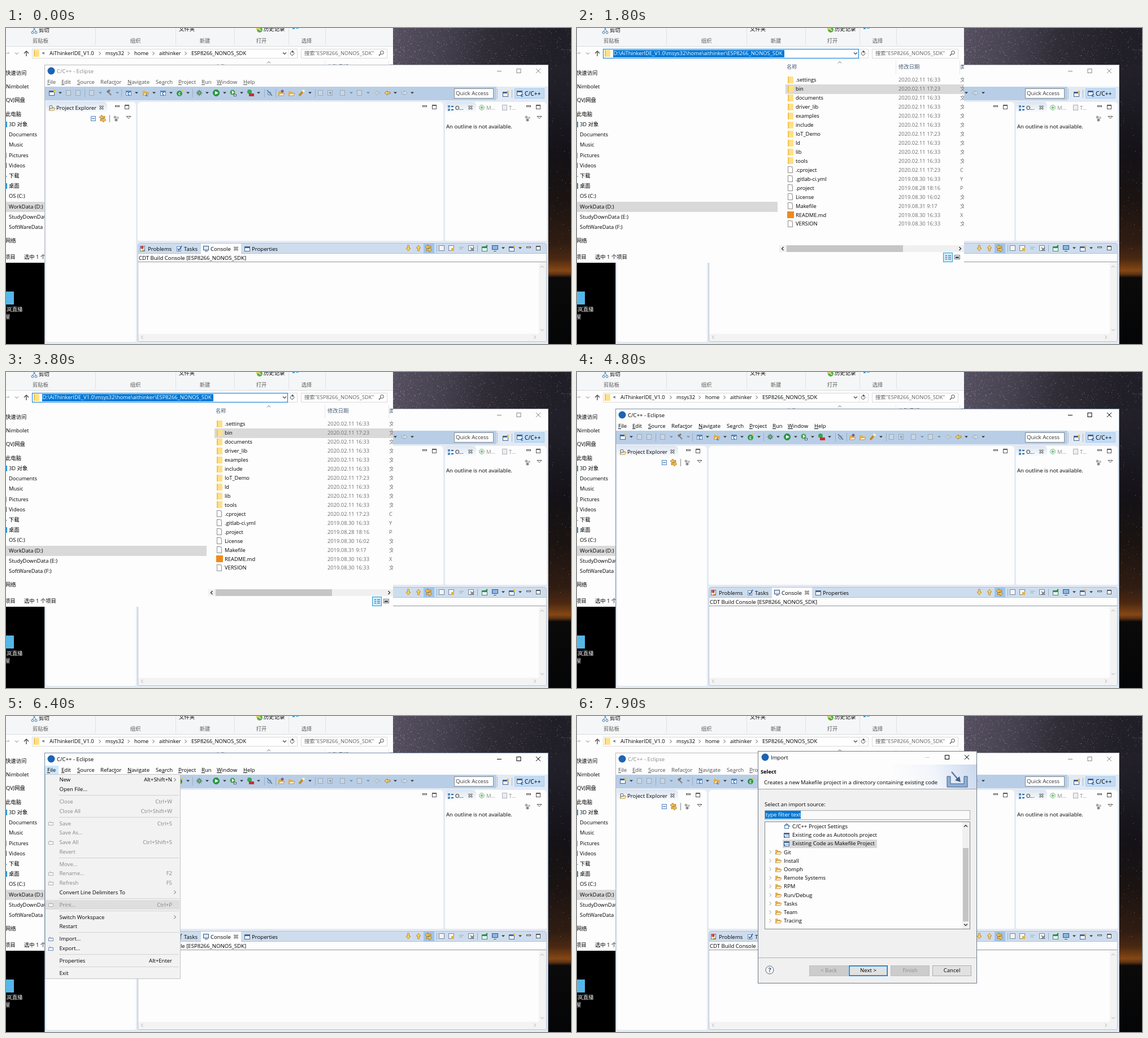
An HTML page with a canvas for the animation above (8 s loop, 1000 px wide and 560 px high).

```html
<!DOCTYPE html>
<html lang="zh">
<head>
<meta charset="utf-8">
<title>Import a Makefile project</title>
<style>
html, body { margin: 0; width: 100%; height: 100%; overflow: hidden; background: #000; }
canvas { display: block; width: 1000px; height: 560px; }
</style>
</head>
<body>
<canvas id="stage" width="1000" height="560"></canvas>
<script>
const LOOP = 8000;
const FONT = '"Open Sans","Noto Sans CJK SC","Noto Sans CJK",sans-serif';
const BLUE = '#0078d7', HOVER = '#91c9f7', GREY = '#d9d9d9', DIM = '#8c8c8c';
const SYSTEM_SIZE = 9.35, APP_SIZE = 9.58;
let c = document.getElementById('stage').getContext('2d');
let fontSize = SYSTEM_SIZE;

function box(x, y, w, h, fill, edge) {
  if (fill) { c.fillStyle = fill; c.fillRect(x, y, w, h); }
  if (edge) { c.strokeStyle = edge; c.lineWidth = 1; c.strokeRect(x + .5, y + .5, w - 1, h - 1); }
}
function text(s, x, y, color = '#000', align = 'left', size = fontSize, weight = '') {
  c.font = `${weight} ${size}px ${FONT}`;
  c.textAlign = align;
  c.textBaseline = 'alphabetic';
  c.fillStyle = color;
  c.fillText(s, x, Math.round(y + 3.4));
}
function path(points, color, width = 1) {
  c.strokeStyle = color;
  c.lineWidth = width;
  c.beginPath();
  for (let i = 0; i < points.length; i += 2) c.lineTo(points[i], points[i + 1]);
  c.stroke();
}
function poly(points, color) {
  c.fillStyle = color;
  c.beginPath();
  for (let i = 0; i < points.length; i += 2) c.lineTo(points[i], points[i + 1]);
  c.fill();
}
function disc(x, y, r, fill, edge) {
  c.beginPath();
  c.arc(x, y, r, 0, 7);
  if (fill) { c.fillStyle = fill; c.fill(); }
  if (edge) { c.strokeStyle = edge; c.lineWidth = 1; c.stroke(); }
}
function panel(x, y, w, h, fill = '#fdfdfd', edge) {
  c.beginPath();
  c.roundRect(x + .5, y + .5, w - 1, h - 1, [5, 5, 2, 2]);
  c.fillStyle = fill;
  c.fill();
  c.strokeStyle = edge || fill;
  c.lineWidth = 1;
  c.stroke();
}
function fade(alpha, draw) {
  if (alpha <= 0) return;
  c.save();
  c.globalAlpha = alpha;
  draw();
  c.restore();
}
const gradient = (x0, y0, x1, y1, stops) => {
  const g = c.createLinearGradient(x0, y0, x1, y1);
  stops.forEach(([p, color]) => g.addColorStop(p, color));
  return g;
};

// Small glyphs, all placed by their centre
const chevrons = { right: [-1.5, -3, 1.5, 0, -1.5, 3], left: [1.5, -3, -1.5, 0, 1.5, 3], up: [-3, 1.5, 0, -1.5, 3, 1.5], down: [-3, -1.5, 0, 1.5, 3, -1.5] };
const chevron = (x, y, dir, color = '#555', w = 1) => path(chevrons[dir].map((v, i) => v + (i % 2 ? y : x)), color, w);
const drop = (x, y, color = '#333') => poly([x - 3, y - 1.5, x + 3, y - 1.5, x, y + 1.5], color);
function cross(x, y, r, color, w = 1) {
  path([x - r, y - r, x + r, y + r], color, w);
  path([x + r, y - r, x - r, y + r], color, w);
}
function tabClose(x, y) {
  cross(x, y, 3.2, '#555', 2.6);
  cross(x, y, 3.2, '#fdfdfd', 1);
}
function arrow(x, y, dx, dy, color, edge) {
  const at = (a, b) => [x + a * dx - b * dy, y + a * dy + b * dx];
  const p = [...at(5, 0), ...at(0, -4), ...at(0, -1.5), ...at(-5, -1.5), ...at(-5, 1.5), ...at(0, 1.5), ...at(0, 4)];
  poly(p, color);
  path([...p, p[0], p[1]], edge, .8);
}
function folder(x, y) {
  box(x - 5, y - 6, 10, 12, '#ffe08a');
  box(x - 5, y - 6, 2, 12, '#f2c34e');
}
function openFolder(x, y) {
  poly([x - 5, y + 4, x - 5, y - 4, x - 1, y - 4, x, y - 2, x + 4, y - 2, x + 4, y + 4], '#e9b14c');
  poly([x - 5, y + 4, x - 2, y, x + 6, y, x + 4, y + 4], '#fff0c4');
  path([x - 5, y + 4, x - 2, y, x + 6, y, x + 4, y + 4, x - 5, y + 4], '#b67b22', .8);
}
function sheet(x, y) {
  box(x - 4, y - 6, 9, 12, '#fff', '#8d8d8d');
  box(x + 2, y - 6, 3, 3, '#c8c8c8');
}
function win(x, y, color = '#47658f') {
  box(x - 5, y - 4, 10, 9, '#f4f8fd', color);
  box(x - 5, y - 4, 10, 3, color);
}
function cfile(x, y, mark = '#2f67b2') {
  win(x, y, '#5c86b8');
  text('c', x, y + .5, mark, 'center', 8, 'bold');
}
function swap(x, y) {
  arrow(x - 1, y - 2, -1, 0, '#f3c35b', '#a06d14');
  arrow(x + 1, y + 3, 1, 0, '#f3c35b', '#a06d14');
}
function minMax(x, y) {
  box(x - 4, y - 3, 8, 3, '#fff', '#555');
  box(x + 13, y - 4, 8, 8, '#fff', '#555');
  box(x + 13, y - 4, 8, 2, '#555');
}
function titleButtons(x, y, gap, color) {
  path([x - 4, y + .5, x + 4, y + .5], color);
  box(x + gap - 4, y - 4, 8, 8, null, color);
  cross(x + gap * 2, y, 4, color);
}
function dots(x, y) {
  disc(x - 2, y - 2, 2.5, '#aaa');
  disc(x + 3, y - 1, 2, '#bbb');
  disc(x, y + 3, 2.5, '#888');
}

function makeDesktop() {
  const layer = document.createElement('canvas');
  layer.width = 1000;
  layer.height = 560;
  const main = c;
  c = layer.getContext('2d');
  let seed = 11;
  const rnd = () => (seed = seed * 16807 % 2147483647) / 2147483647;
  box(0, 0, 1000, 560, '#000');
  box(684, 0, 316, 560, gradient(0, 0, 0, 560, [[0, '#28252f'], [.2, '#1f1d26'], [.4, '#141217'], [.54, '#1a1311'],
    [.68, '#2f1c12'], [.73, '#4a2812'], [.768, '#854816'], [.78, '#5a3012'], [.79, '#0b0a0b'], [1, '#040506']]));
  box(684, 0, 316, 66, gradient(684, 10, 960, 66, [[0, '#544e5e'], [.3, '#474250'], [.6, '#2f2c36'], [1, '#201e26']]));
  // Dense star haze on the left of the band, sparse elsewhere
  for (let i = 0; i < 3000; i++) {
    const band = i < 2800, x = band ? 684 + 316 * rnd() ** 1.8 : 960 + 40 * rnd(), y = band ? 66 * rnd() : 66 + 330 * rnd();
    c.fillStyle = `rgba(205,198,215,${.04 + .5 * rnd() ** 5})`;
    c.fillRect(x | 0, y | 0, 1, 1);
  }
  box(0, 467, 14, 23, '#55b7e8');
  text('浮岚直播', -8, 499, '#fff');
  text('屋', -2, 512, '#fff');
  c = main;
  return layer;
}
const desktop = makeDesktop();

const places = [['快速访问', -1, 80], ['Nimbolet', 0, 104], ['QVJ网盘', 0, 128], ['此电脑', -1, 153], ['3D 对象', 5, 171],
  ['Documents', 5, 189], ['Music', 5, 207], ['Pictures', 5, 226], ['Videos', 5, 244], ['下载', 5, 262], ['桌面', 5, 280],
  ['OS (C:)', 5, 298], ['WorkData (D:)', 5, 317], ['StudyDownData (E:)', 5, 335], ['SoftWareData (F:)', 5, 353],
  ['网络', -1, 377], ['项目', -2, 406], ['选中 1 个项目', 32, 406]];
const files = ['.settings', 'bin', 'documents', 'driver_lib', 'examples', 'include', 'IoT_Demo', 'ld', 'lib', 'tools',
  '.cproject', '.gitlab-ci.yml', '.project', 'License', 'Makefile', 'README.md', 'VERSION'];
const dates = { 10: '2020.02.11 17:23', 12: '2019.08.28 18:16', 13: '2019.08.30 16:02', 14: '2019.08.31 9:17' };
const kinds = { 10: 'C', 11: 'Y', 12: 'P', 15: 'X' };

function drawAddress(t) {
  const editing = t >= 1300 && t < 3900;
  path([0, 45, 6, 45, 3, 42], '#aaa');
  chevron(19, 45, 'down', '#777');
  path([36, 50, 36, 41], '#444', 1.3);
  path([32, 45, 36, 41, 40, 45], '#444', 1.3);
  box(46, 37, 470, 17, '#fff', GREY);
  folder(54, 45);
  if (editing) {
    box(46, 37, 453, 17, null, BLUE);
    box(64, 39, 303, 13, BLUE);
    text('D:\\AiThinkerIDE_V1.0\\msys32\\home\\aithinker\\ESP8266_NONOS_SDK', 64.5, 45, '#fff');
    if (t < 1800 || (t >= 2300 && t < 2800)) box(366, 39, 1, 13, '#ff8728');
  } else {
    text('«', 64, 44);
    [['AiThinkerIDE_V1.0', 77], ['msys32', 176], ['home', 227], ['aithinker', 271], ['ESP8266_NONOS_SDK', 328]]
      .forEach(([s, x], i) => { if (i) chevron(x - 10, 45, 'right'); text(s, x, 45); });
    box(499, 38, 1, 15, '#e5e5e5');
    if (t >= 900 && t < 1200) box(487, 37, 13, 17, '#e5f3ff', '#99d1ff');
  }
  chevron(493, 45, 'down', '#444', 1.2);
  c.beginPath();
  c.arc(506.5, 45, 3.3, -.6, 4.8);
  c.strokeStyle = '#555'; c.lineWidth = 1; c.stroke();
  poly([506, 39.5, 510, 42, 506, 44], '#555');
  box(522, 37, 153, 17, '#fff', GREY);
  text('搜索"ESP8266_NONOS_SDK"', 528, 45, '#606060');
  disc(665.5, 43.5, 3, null, '#444');
  path([663, 46, 660, 49], '#444', 1.3);
}

function drawExplorer(t) {
  fontSize = SYSTEM_SIZE;
  c.save();
  c.beginPath();
  c.rect(0, 0, 685, 416);
  c.clip();
  box(0, 0, 685, 416, '#fdfdfd');
  box(0, 0, 685, 32, '#f5f6f7');
  box(0, 32, 685, 1, '#dadbdc');
  [158, 300, 404, 500, 565].forEach(x => box(x, 0, 1, 30, '#e0e1e2'));
  [['剪贴板', 61], ['组织', 229], ['新建', 352], ['打开', 452], ['选择', 532]]
    .forEach(([s, x]) => text(s, x, 23, '#5a5a5a', 'center'));
  path([48, -1, 53, 6], '#3b78b5'); path([52, -1, 47, 6], '#3b78b5');
  disc(47, 8, 2, null, '#3b78b5'); disc(53, 8, 2, null, '#3b78b5');
  text('剪切', 58, 4); text('文件夹', 306, 2); text('历史记录', 456, 2);
  disc(449, 3, 5, '#58b13e'); box(443, 0, 5, 3, '#f2c34e'); path([449, 0, 449, 4, 452, 4], '#fff');
  box(507, 0, 4, 2, '#4a9ad4'); box(513, 0, 5, 1, '#4a9ad4');
  drawAddress(t);

  box(0, 308, 355, 18, GREY);
  places.forEach(p => text(...p));
  box(0, 166, 2, 10, '#2196d8'); box(0, 275, 2, 10, '#1e90d8'); box(0, 239, 1, 9, '#555');
  box(0, 221, 1, 10, '#999'); path([0, 264, 1.5, 262], '#2f78c4');

  chevron(465, 61, 'up', '#666');
  box(564, 58, 1, 24, '#e5e5e5'); box(677, 58, 1, 24, '#e5e5e5');
  text('名称', 371, 69, '#4c607a'); text('修改日期', 569, 69, '#4c607a'); text('类', 678, 69, '#4c607a');
  box(369, 100, 316, 17, GREY);
  files.forEach((name, i) => {
    const y = 92 + 15.94 * i, px = Math.round(y);
    if (i < 10) folder(378, px);
    else if (i === 15) box(372, px - 6, 12, 12, '#ee8a1d');
    else sheet(377, px);
    text(name, 387, y);
    text(dates[i] || (i < 10 ? `2020.02.11 ${i === 1 || i === 6 ? '17:23' : '16:33'}` : '2019.08.30 16:33'), 569, y, '#6d6d6d');
    text(kinds[i] || '文', 678, y, '#6d6d6d');
  });
  box(358, 385, 327, 12, '#f0f0f0');
  box(371, 385, 206, 12, '#c6c6c6');
  chevron(364, 391, 'left', '#333', 1.4); chevron(678, 391, 'right', '#333', 1.4);
  box(648, 398, 17, 17, '#cce8ff', '#26a0da');
  [403, 406, 409].forEach(y => { box(652, y, 3, 1, '#555'); box(657, y, 5, 1, '#555'); });
  box(668, 402, 10, 8, '#e9eef3', '#777'); box(670, 405, 6, 3, '#456');
  c.restore();
}

const menus = [['File', 73, 0], ['Edit', 98, 0], ['Source', 126, 0], ['Refactor', 167, 5], ['Navigate', 215, 0], ['Search', 265, 2],
  ['Project', 305, 0], ['Run', 346, 0], ['Window', 373, 0], ['Help', 420, 0]];

function drawToolbar(t) {
  box(69, 104, 890, 24, '#b8cee6');
  if (t === 4200) box(514, 107, 31, 18, '#d5e6f7', '#8fb8e0');
  const y = 115;
  [139, 204, 330, 457, 477, 547].forEach(x => box(x, 108, 1, 15, '#98aec8'));
  [96, 167, 197, 231, 262, 292, 322, 356, 387, 417, 447, 538, 611, 641, 689, 719]
    .forEach(x => drop(x, y, x === 167 || x === 197 || x === 611 || x === 641 ? '#7d8b9c' : '#333'));
  win(81, y); box(84, 109, 3, 5, '#eec04c');
  [111, 128, 152, 557, 574, 596, 626].forEach(x => box(x - 5, y - 5, 9, 10, '#c9d5e2', '#9aa9ba'));
  text('¶', 574, y, '#8795a6', 'center', 8);
  path([179, 111, 186, 119], '#8b8b8b', 2.5);
  path([179, 114, 184, 110], '#777', 3);
  cfile(217, y); openFolder(247, y); text('c', 249, 118, '#2f67b2', 'center', 8, 'bold'); cfile(278, y);
  disc(307, 116, 5, '#2d9a45'); text('c', 307, 115.5, '#fff', 'center', 8, 'bold'); box(310, 109, 3, 4, '#eec04c');
  for (let a = 0; a < 6.2; a += Math.PI / 4) path([342, y, 342 + 5.5 * Math.cos(a), y + 5.5 * Math.sin(a)], '#3d6f74');
  disc(342, y, 3.2, '#7fb25c', '#35686f');
  disc(372, y, 5.5, '#2fa043', '#1d7831'); poly([370, 112, 376, 115, 370, 118], '#fff');
  disc(401, 114, 4.5, '#41a34f'); poly([400, 111, 404, 114, 400, 117], '#fff'); box(403, 117, 5, 4, '#f3f7fa', '#555');
  disc(431, 113, 4, '#41a34f'); box(430, 116, 9, 5, '#c5302c');
  path([462, 110, 471, 120], '#45658f', 1.2); disc(466, 116, 3, null, '#6a86aa');
  openFolder(487, 116); disc(489, 112, 2.5, '#7c59a6'); openFolder(505, 116);
  path([519, 120, 525, 113], '#c58a2c', 4); path([525, 113, 528, 110], '#fff1b8', 4);
  arrow(657, y, -1, 0, '#d3d4d0', '#a6aeb5');
  arrow(675, y, -1, 0, '#f7d26a', '#9b6f1b'); arrow(705, y, 1, 0, '#dfe4e8', '#8d9bab');
  box(868, 104, 91, 24, '#e2eaf4');
  box(793, 107, 70, 18, '#fff', '#7f8a96');
  text('Quick Access', 796, 116, '#333', 'left', 9.7);
  for (let v = 108; v < 125; v += 3) box(869, v, 1, 2, '#8ea4bf');
  win(884, 117); box(887, 111, 3, 5, '#eec04c');
  box(895, 109, 1, 15, '#a9b8c9');
  box(900, 107, 53, 18, '#c3dcf5', '#a4cbee');
  win(909, 115); text('c', 913, 119, '#2f67b2', 'center', 9, 'bold');
  text('C/C++', 918, 117, '#000', 'left', 10.3);
}

function drawParts() {
  box(69, 128, 890, 432, '#e4eaf4');
  panel(71, 131, 159, 425); panel(233, 131, 541, 246); panel(777, 131, 180, 246);
  panel(233, 381, 724, 175, '#fdfdfd', '#b3bfcf');
  panel(71, 131, 108, 19, gradient(0, 131, 0, 150, [[0, '#dce5f1'], [1, '#fafcfe']]));
  openFolder(81, 142); box(77, 137, 5, 6, '#f4f8fd', '#5c86b8');
  text('Project Explorer', 89, 141.5);
  tabClose(169, 141); minMax(197, 140); minMax(741, 140);
  box(150, 156, 9, 9, '#eaf2fb', '#5c86b8'); box(152, 160, 5, 1, '#2f67b2');
  swap(171, 160); box(183, 154, 1, 13, '#888'); dots(195, 160);
  path([213, 156.5, 221, 156.5, 217, 160.5, 213, 156.5], '#555');

  panel(777, 131, 55, 19, gradient(0, 131, 0, 150, [[0, '#dce5f1'], [1, '#fafcfe']]));
  [137, 143].forEach(y => { box(782, y, 4, 4, '#4f8dcc'); box(788, y + 1, 4, 2, '#35608f'); });
  text('O...', 795, 141.5); tabClose(822, 141);
  disc(842, 141, 4.5, '#dff0df', '#8cc197'); disc(842, 141, 2, '#7bbd88');
  text('M...', 850, 141.5, DIM);
  box(878, 136, 9, 10, '#eee', '#a9b0ba'); text('T...', 890, 141.5, DIM);
  minMax(925, 140); dots(923, 160);
  path([940, 156.5, 948, 156.5, 944, 160.5, 940, 156.5], '#555');
  text('An outline is not available.', 779, 175);

  panel(233, 381, 724, 19, '#cedded', '#b3bfcf');
  box(345, 382, 71, 18, '#fdfdfd');
  box(237, 386, 9, 10, '#fff', '#5576a0'); disc(241, 389, 2.7, '#d2423b'); box(241, 393, 4, 2, '#e3a92f');
  box(302, 387, 8, 9, '#f5f9fd', '#6a89b0'); path([304, 391, 306, 394, 311, 386], '#2e5fa5', 1.5);
  box(349, 386, 10, 8, '#d9e8f7', '#34557f'); box(352, 395, 5, 1, '#34557f');
  win(427, 391);
  text('Problems', 251, 391.5); text('Tasks', 315, 391.5); text('Console', 362, 391.5); text('Properties', 435, 391.5);
  tabClose(407, 391);
  arrow(712, 390, 0, 1, '#f9d36a', '#b07c1a'); arrow(730, 390, 0, -1, '#f9d36a', '#b07c1a');
  box(739, 382, 19, 17, '#9fc4ea'); swap(748, 390);
  box(762, 384, 1, 13, '#98aec8'); box(834, 384, 1, 13, '#98aec8');
  [771, 788, 823].forEach(x => box(x - 5, 385, 10, 10, '#f1f4f8', '#77869a'));
  box(788, 390, 5, 5, '#e5b13d'); cross(825, 392, 3, '#666', 1.3);
  box(802, 388, 8, 1, '#9aa9ba'); box(802, 391, 6, 1, '#9aa9ba');
  win(847, 391, '#3a8a55'); path([847, 390, 852, 385], '#2a8d48', 2);
  box(860, 385, 11, 8, '#8db7e4', '#34557f'); box(863, 395, 5, 1, '#34557f');
  drop(880, 390); win(895, 391); box(898, 385, 3, 4, '#eec04c'); drop(910, 390);
  minMax(925, 390);
  text('CDT Build Console [ESP8266_NONOS_SDK]', 235, 408);
  box(234, 414, 722, 1, '#8f959c');
  box(943, 416, 13, 126, '#f3f3f3'); box(234, 542, 722, 12, '#f3f3f3');
  chevron(949, 423, 'up', '#aaa'); chevron(949, 535, 'down', '#aaa');
  chevron(241, 548, 'left', '#aaa'); chevron(936, 548, 'right', '#aaa');
}

function drawEclipse(t) {
  fontSize = APP_SIZE;
  const active = t >= 3900 && t < 7500, ink = active ? '#000' : '#505050';
  box(68, 65, 892, 495, '#fdfdfd', active ? '#7890aa' : '#b4b9c0');
  disc(80, 76, 6.5, '#1c63b4');
  text('C/C++ - Eclipse', 90, 76.5, active ? '#000' : '#888');
  titleButtons(873, 76, 34.5, active ? '#000' : '#888');
  if (t >= 5300 && t < 7300) box(69, 88, 24, 15, t >= 5600 ? '#cce8ff' : '#e5f3ff');
  menus.forEach(([s, x, k]) => {
    text(s, x, 95.5, ink);
    const skip = c.measureText(s.slice(0, k)).width, w = c.measureText(s[k]).width;
    box(x + skip, 100, w, 1, ink);
  });
  drawToolbar(t);
  drawParts();
  if ((t >= 4300 && t < 4800) || (t >= 5300 && t < 5600)) box(237, 416, 1, 11, '#000');
}

// Menu rows: "-" is a separator, a leading "~" is disabled, "|" starts the shortcut, ">" a submenu
const fileMenu = ['New|Alt+Shift+N>', 'Open File...', '-', '~Close|Ctrl+W', '~Close All|Ctrl+Shift+W', '-', '~Save|Ctrl+S', '~Save As...',
  '~Save All|Ctrl+Shift+S', '~Revert', '-', '~Move...', '~Rename...|F2', '~Refresh|F5', 'Convert Line Delimiters To>', '-',
  '~Print...|Ctrl+P', '-', 'Switch Workspace>', 'Restart', '-', 'Import...', 'Export...', '-', 'Properties|Alt+Enter', '-', 'Exit'];
const editMenu = ['~撤消(U)', '-', '剪切(T)', '复制(C)', '粘贴(P)', '删除(D)', '-', '~全选(A)', '-', '从右到左的阅读顺序(R)',
  '显示 Unicode 控制字符(S)', '插入 Unicode 控制字符(I)>', '-', '关闭输入法(L)', '汉字重选(R)'];

function drawMenu(rows, x, y, w, hover, only) {
  fontSize = 9.5;
  const h = rows.reduce((sum, r) => sum + (r === '-' ? 5.33 : 16.67), 3.5);
  if (!only) box(x, y, w, Math.round(h), '#f2f2f2', '#c3c3c3');
  let top = y + 1.7;
  rows.forEach(row => {
    const mid = top + 8.3, off = row[0] === '~', sub = row.endsWith('>');
    const [label, keys] = row.replace(/[~>]/g, '').split('|');
    if (row === '-') {
      if (!only) box(x + 25, Math.round(top + 2), w - 28, 1, '#d2d2d2');
      top += 5.33;
      return;
    }
    top += 16.67;
    const hot = label === hover;
    if (only && !hot) return;
    if (hot) box(x + 1, Math.round(mid - 8), w - 3, 17, off ? '#dedede' : HOVER);
    const ink = off ? '#858585' : '#000';
    text(label, x + 25.5, mid, ink);
    if (keys) text(keys, x + w - 15, mid, ink, 'right');
    if (sub) chevron(x + w - 10, mid, 'right');
    if (/^(Save|Rename|Refresh|Print|Import|Export)/.test(label) && label !== 'Save As...') {
      const color = off ? '#b3b3b3' : '#6d8fb5';
      box(x + 6, Math.round(mid) - 2, 9, 6, '#f7f7f7', color);
      path([x + 8, mid - 4, x + 12, mid], color);
    }
  });
}

const tree = ['Git', 'Install', 'Oomph', 'Remote Systems', 'RPM', 'Run/Debug', 'Tasks', 'Team', 'Tracing'];
const sources = ['C/C++ Project Settings', 'Existing code as Autotools project', 'Existing Code as Makefile Project'];

function button(label, x, state) {
  box(x, 442, 69, 19, state === 'off' ? '#cccccc' : '#e1e1e1', state === 'off' ? '#bfbfbf' : '#adadad');
  if (state === 'main') { c.strokeStyle = BLUE; c.lineWidth = 1.6; c.strokeRect(x + .8, 442.8, 67.4, 17.4); }
  text(label, x + 34.5, 451, state === 'off' ? '#8b8b8b' : '#000', 'center');
}

function drawDialog() {
  fontSize = APP_SIZE;
  box(320, 62, 388, 412, '#f0f0f0', '#6f7c8a');
  box(321, 63, 386, 23, '#fdfdfd');
  disc(333, 73, 6.5, '#1c63b4');
  text('Import', 343, 73.5);
  path([616, 73.5, 624, 73.5], '#ccc');
  box(651, 69, 8, 8, null, '#000');
  cross(690, 73, 4, '#000');
  box(321, 86, 386, 43, '#fdfdfd');
  box(560, 86, 147, 43, gradient(560, 129, 707, 86, [[0, '#fdfdfd'], [.5, '#f2f5fb'], [1, '#c9d8ee']]));
  box(321, 129, 386, 1, '#a0a0a0');
  text('Select', 325, 99, '#000', 'left', 9.3, 'bold');
  text('Creates a new Makefile project in a directory containing existing code', 331, 118);
  poly([655, 107, 661, 107, 661, 120, 685, 120, 685, 107, 691, 107, 691, 126, 655, 126], '#8faed4');
  path([655, 107, 661, 107, 661, 120, 685, 120, 685, 107, 691, 107, 691, 126, 655, 126, 655, 107], '#3e608c');
  path([663, 99, 675, 113], '#4e6d97', 2);
  poly([679, 117, 669, 114, 677, 107], '#3e608c');

  text('Select an import source:', 332, 157);
  box(332, 167, 364, 17, '#fafafa', '#a9adb3');
  box(333, 168, 63, 14, BLUE);
  text('type filter text', 334, 175, '#fff');
  box(332, 187, 364, 191, '#fdfdfd', '#828790');
  box(364, 219, 167, 15, GREY);
  sources.forEach((s, i) => {
    const y = 195.5 + 15.2 * i;
    if (i) { win(371, Math.round(y)); text('c++', 371, y + 1, '#2f67b2', 'center', 5, 'bold'); }
    else { box(367, 193, 8, 7, '#eaf2fb', '#4f78ab'); path([367, 195, 371, 191, 377, 196], '#4f78ab', 1.4); }
    text(s, 381, y);
  });
  tree.forEach((s, i) => {
    const y = 241.1 + 15.2 * i;
    chevron(342, y, 'right', '#999');
    openFolder(356, Math.round(y));
    text(s, 366, y);
  });
  box(682, 188, 13, 189, '#f0f0f0');
  box(683, 234, 10, 130, '#c4c4c4');
  chevron(688, 195, 'up', '#333', 1.3); chevron(688, 370, 'down', '#333', 1.3);
  box(321, 428, 386, 1, '#b0b0b0');
  disc(341, 450, 7, '#f6f8fc', '#55657e');
  text('?', 341, 450.5, '#44546d', 'center', 11, 'bold');
  button('< Back', 411, 'off'); button('Next >', 481, 'main'); button('Finish', 555, 'off'); button('Cancel', 629);
}

// Value of the last key that has been reached
const step = (t, keys, start) => keys.reduce((v, [at, next]) => t >= at ? next : v, start);

const fileHover = [[6000, 'New'], [6100, 'Close All'], [6200, 'Save All'], [6300, 'Refresh'], [6400, 'Print...'],
  [6700, 'Switch Workspace'], [6900, 'Import...']];

function draw(t) {
  c.drawImage(desktop, 0, 0);
  const explorerFirst = t < 1200 || t >= 3900;
  (explorerFirst ? [drawExplorer, drawEclipse] : [drawEclipse, drawExplorer]).forEach(f => f(t));

  fade(step(t, [[2300, .3], [2400, .75], [2500, 1], [3300, .75], [3400, .4], [3500, .15], [3600, 0]], 0),
    () => drawMenu(editMenu, 397, 45, 176, t >= 2600 ? '复制(C)' : '', t >= 3300));
  fade(step(t, [[5600, .4], [5700, .94], [5800, 1], [7300, .78], [7400, .35], [7500, 0]], 0),
    () => drawMenu(fileMenu, 69, 103, 240, step(t, fileHover, ''), t >= 7300));
  if (t === 6800) fade(.3, () => box(312, 345, 202, 30, '#f2f2f2', '#c3c3c3'));

  fade(step(t, [[7600, .25], [7700, .65], [7800, .9], [7900, 1]], 0), () => {
    const k = step(t, [[7700, .97], [7800, .99], [7900, 1]], .93);
    c.translate(514, 268);
    c.scale(k, k);
    c.translate(-514, -268);
    drawDialog();
  });
}

let last = -1;
function tick() {
  const t = Math.floor(performance.now() % LOOP / 100) * 100;
  if (t !== last) draw(last = t);
  requestAnimationFrame(tick);
}
tick();
</script>
</body>
</html>
```
